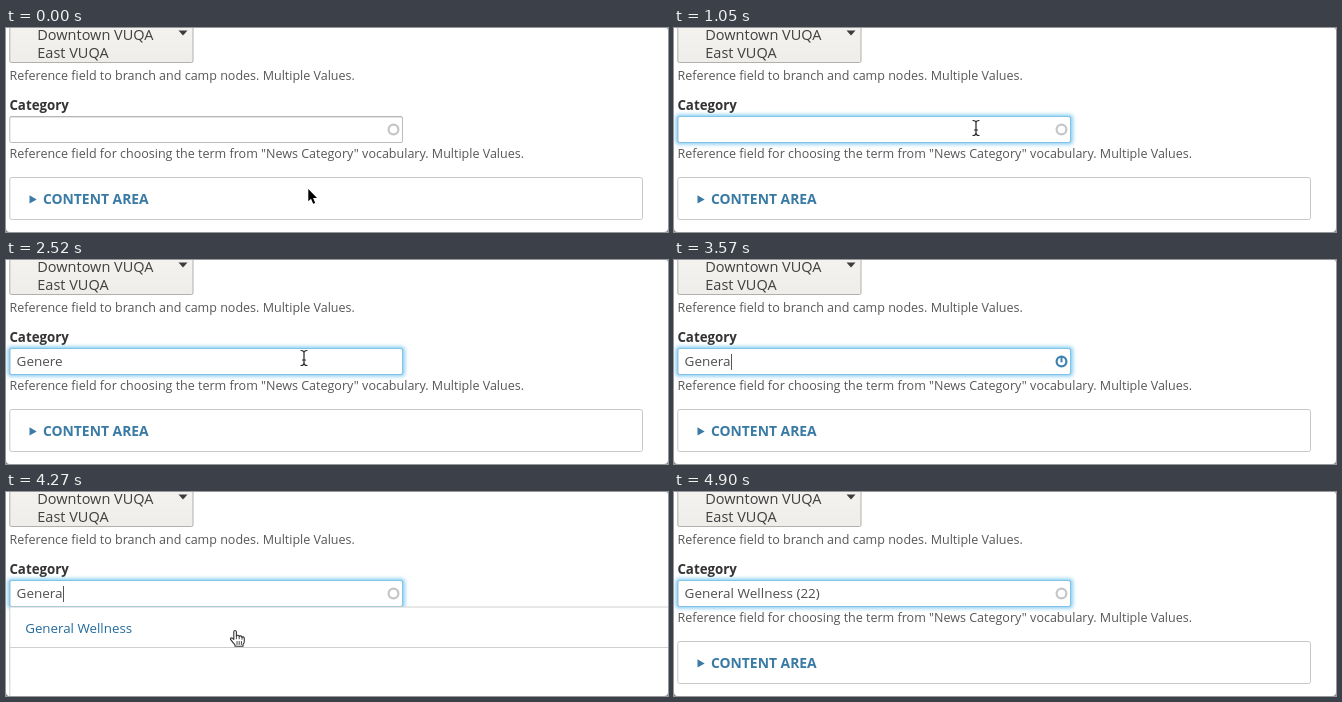
Recreate the animation shown at these times as an HTML page. Size 662 px wide and 204 px high, loop 4970 ms.

```html
<!DOCTYPE html>
<html lang="en">
<head>
<meta charset="utf-8">
<title>Category autocomplete</title>
<style>
  html, body { margin: 0; width: 100%; height: 100%; overflow: hidden; background: #fff; }
  svg { display: block; width: 662px; height: 204px; }
  text { font-family: "Open Sans", "Noto Sans", sans-serif; white-space: pre; }
  .option { font-size: 14.5px; fill: #404040; }
  .hint { font-size: 12.53px; fill: #575757; }
  .label { font-size: 13.3px; font-weight: 700; fill: #333; }
  .value { font-size: 13.5px; fill: #505050; }
  .item { font-size: 13.33px; fill: #246b9b; }
  .legend { font-size: 13.9px; font-weight: 700; fill: #3a7ba6; }
</style>
</head>
<body>
<svg viewBox="0 0 662 204" xmlns="http://www.w3.org/2000/svg">
  <defs>
    <linearGradient id="shade" x1="0" y1="0" x2="0" y2="1">
      <stop offset="0" stop-color="#f6f5f2"/>
      <stop offset="1" stop-color="#eeede9"/>
    </linearGradient>
    <filter id="blur" x="-5%" y="-50%" width="110%" height="200%">
      <feGaussianBlur stdDeviation="2"/>
    </filter>
  </defs>

  <rect width="662" height="204" fill="#fff"/>

  <!-- branch list -->
  <rect x="3.8" y="-20" width="183.2" height="54.5" rx="1.500" fill="url(#shade)" stroke="#b0b0ae"/>
  <path d="M172.500 2.500h9l-4.500 5z" fill="#3c3c3c"/>
  <text class="option" x="31.3" y="12">Downtown VUQA</text>
  <text class="option" x="31.3" y="30">East VUQA</text>
  <text class="hint" x="3.5" y="51.8">Reference field to branch and camp nodes. Multiple Values.</text>

  <!-- category field -->
  <text class="label" x="3.4" y="82">Category</text>
  <text class="hint" x="3.500" y="130">Reference field for choosing the term from "News Category" vocabulary. Multiple Values.</text>
  <rect id="glow" x="2" y="87" width="396.500" height="29" rx="2" fill="#62bff0" filter="url(#blur)"/>
  <rect x="3.8" y="88.500" width="392.700" height="26" rx="1.500" fill="#fff" stroke="#bcbcbc"/>
  <path id="edge" d="M4 89h392" stroke="#a8a8a8" stroke-width=".6"/>
  <rect id="ring" x="3.8" y="88.500" width="392.700" height="26" rx="1.500" fill="none" stroke="#84c3e8"/>
  <text id="value" class="value" x="10.6" y="106"></text>
  <path id="caret" stroke="#555"/>
  <g id="idle" transform="translate(387.5 101.5)" fill="none">
    <circle r="4.9" stroke="#c6c6c6" stroke-width="2.2"/>
  </g>
  <g id="busy" fill="none" stroke="#3f82b0">
    <circle r="4.9" stroke-width="2.2"/>
    <path d="M0-4.500V.8" stroke-width="2"/>
  </g>

  <!-- fieldset -->
  <rect x="3.8" y="149.500" width="632.700" height="42" rx="2" fill="none" stroke="#c8c8c8"/>
  <path d="M23.500 167.300v8.200l7.200-4.100z" fill="#3a7ba6"/>
  <text class="legend" x="36.9" y="175.800">CONTENT AREA</text>

  <!-- suggestions -->
  <g id="menu">
    <rect x="3.8" y="115" width="670" height="100" fill="#fff" stroke="#d0d0d0"/>
    <path d="M4 155.500h658" stroke="#d0d0d0"/>
    <text class="item" x="19.2" y="140.500">General Wellness</text>
  </g>

  <!-- window corners -->
  <path d="M0 200V204H4Q0 204 0 200zM662 200V204H658Q662 204 662 200zM662 2V0H660Q662 0 662 2z" fill="#8d8d8d"/>

  <!-- pointers -->
  <g id="arrow">
    <path d="M.3 0V12.300L3 9.800L5.200 14.800L7.200 13.900L5.100 9.100H9z" fill="#000" stroke="#fff" stroke-width="1.600" paint-order="stroke" stroke-linejoin="round"/>
  </g>
  <g id="beam" fill="none" stroke-linecap="round">
    <path d="M-3-7.500Q0-7.500 0-5V5Q0 7.500-3 7.500M3-7.500Q0-7.500 0-5M0 5Q0 7.500 3 7.500M-1.500 2H1.500" stroke="#fff" stroke-width="3"/>
    <path d="M-3-7.500Q0-7.500 0-5V5Q0 7.500-3 7.500M3-7.500Q0-7.500 0-5M0 5Q0 7.500 3 7.500M-1.500 2H1.500" stroke="#222" stroke-width="1.200"/>
  </g>
  <g id="hand" stroke="#333" stroke-linejoin="round" stroke-linecap="round">
    <path d="M-1.200 9V1.300Q-1.200 0 0 0T1.400 1.300V5.500Q1.600 4.700 2.800 4.700T4.200 6Q4.500 5.300 5.600 5.400T7 6.800Q7.300 6.200 8.200 6.400T9.300 7.800V10.800Q9.300 12.300 8 14V15.700H0V14.300Q-2.200 12-4.300 9.200Q-5 8-4 7.500T-1.200 9z" fill="#fff" stroke-width="1.100"/>
    <path d="M1.400 5.500V8.300M4.200 6V8.300M7 6.800V8.800M2 11V14M4.200 11V14M6.400 11V14" fill="none" stroke-width=".9"/>
  </g>
</svg>
<script>
const LOOP = 4970, STEP = 70;
const $ = id => document.getElementById(id);
const show = (id, on) => $(id).setAttribute('visibility', on ? 'visible' : 'hidden');
const place = (id, x, y, turn = 0) =>
  $(id).setAttribute('transform', `translate(${x} ${y}) rotate(${turn})`);
const clamp = v => Math.max(0, Math.min(1, v));
const smooth = v => v * v * (3 - 2 * v);
const within = (t, spans) => spans.some(([a, b]) => t >= a && t < b);

const typed = [
  [0, ''], [1190, 'G'], [1540, 'Ge'], [1680, 'Gen'], [1750, 'Gene'], [1820, 'Gener'],
  [2030, 'Genere'], [3150, 'Gener'], [3290, 'Genera'], [4410, 'General Wellness (22)']
];
const caretOn = [[560, 1050], [1190, 2520], [3080, 3780], [4270, 4760]];
const busyOn = [[2590, 2730], [3570, 3780]];
const pointerOff = [[1120, 2520], [3150, 3780], [4900, LOOP]];

// time, x, y of the pointer's hot spot
const path = [
  [0, 302, 161], [420, 302, 100], [1120, 302, 100],
  [2520, 298, 98], [2800, 291, 99], [3780, 291, 99],
  [3920, 258, 113], [4060, 240, 129], [4270, 229, 138.5],
  [4690, 229, 138.5], [4830, 303, 192], [4900, 315, 210]
];

function pointerAt(t) {
  const i = path.findIndex(p => p[0] > t);
  if (i < 0) return path[path.length - 1].slice(1);
  const [t0, x0, y0] = path[i - 1], [t1, x1, y1] = path[i];
  const k = smooth((t - t0) / (t1 - t0));
  return [x0 + (x1 - x0) * k, y0 + (y1 - y0) * k];
}

function drawPointer(t) {
  const [x, y] = pointerAt(t);
  const kind = within(t, [[3990, 4480]]) ? 'hand' : y < 115 ? 'beam' : 'arrow';
  const visible = !within(t, pointerOff);
  for (const id of ['arrow', 'beam', 'hand']) {
    show(id, visible && id === kind);
    place(id, x, y);
  }
}

function draw(time) {
  const t = Math.floor((time % LOOP) / STEP) * STEP;

  const focus = clamp((t - 490) / 280);
  $('glow').setAttribute('opacity', focus * 0.9);
  $('ring').setAttribute('opacity', focus);
  $('edge').setAttribute('opacity', 1 - focus);

  const value = $('value');
  value.textContent = typed.filter(k => k[0] <= t).pop()[1];
  const end = value.textContent ? value.getComputedTextLength() : 0;
  $('caret').setAttribute('d', `M${Math.round(10.6 + end) + 0.5} 94V110`);
  show('caret', within(t, caretOn));

  const busy = within(t, busyOn);
  show('busy', busy);
  show('idle', !busy && !within(t, [[2380, 2590]]));
  place('busy', 387.5, 101.5, (t - 3570) / STEP * 60);

  show('menu', within(t, [[3850, 4410]]));
  drawPointer(t);
}

const start = performance.now();
function tick() {
  draw(performance.now() - start);
  requestAnimationFrame(tick);
}
tick();
</script>
</body>
</html>
```
